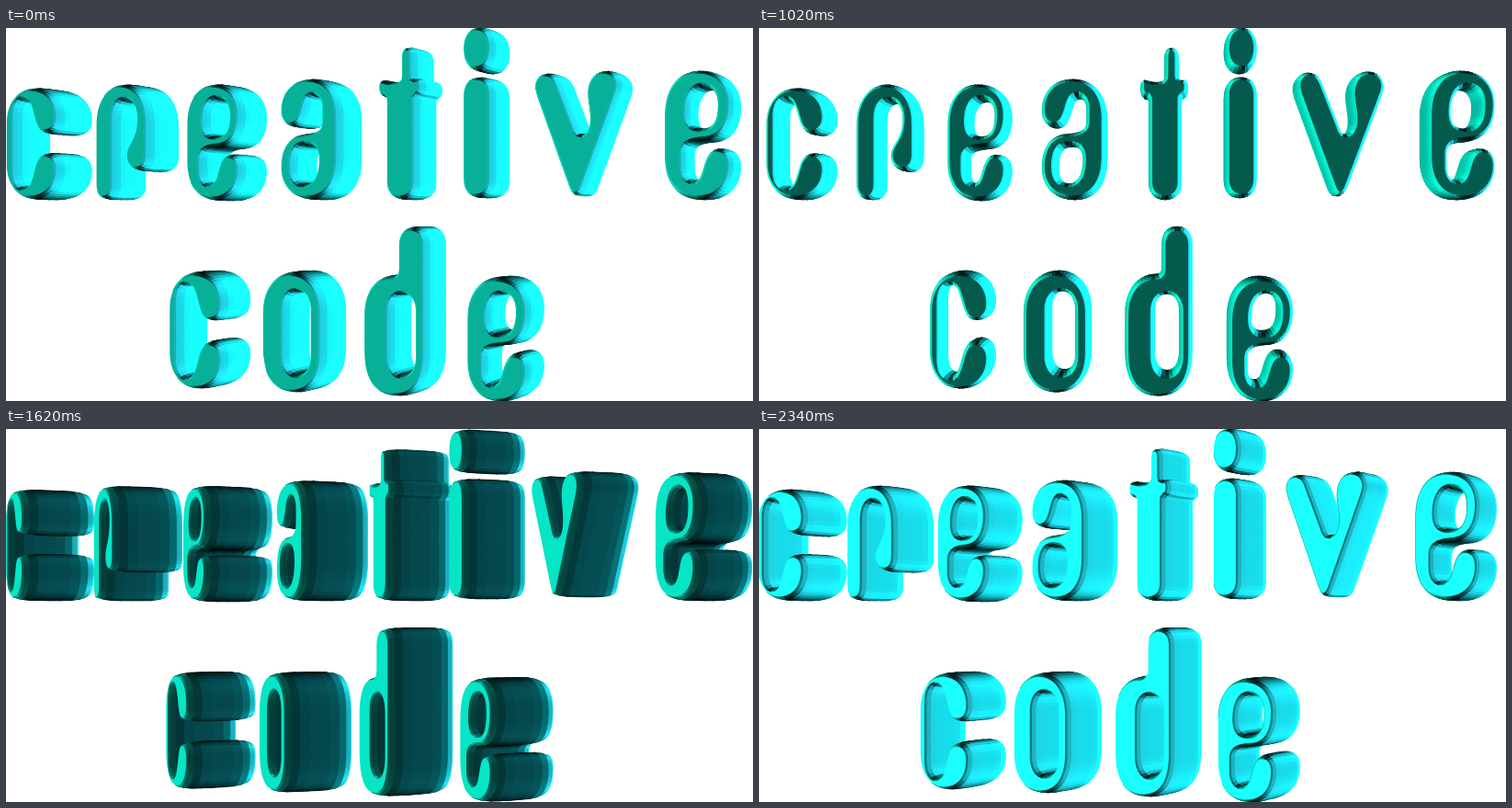
An HTML page with a canvas for the animation above (2.4 s loop, 813 px wide and 406 px high).

```html
<!DOCTYPE html>
<html lang="en">
<head>
<meta charset="utf-8">
<title>creative code</title>
<style>
  html, body { margin: 0; width: 100%; height: 100%; overflow: hidden; background: #fff; }
  canvas { display: block; width: 813px; height: 406px; }
</style>
</head>
<body>
<canvas id="stage" width="813" height="406" role="img" aria-label="creative code"></canvas>
<script>
const ctx = document.getElementById('stage').getContext('2d');
const LOOP = 2400, STEP = 60;
const MID_X = 406, MID_Y = 203, CAMERA = 1950;
const HALF = 40, BULGE = 4, SPREAD = 0.4, BANDS = 10;

// Outlines with the centre they turn about; later subpaths are holes.
const glyphs = {
  c: [47, 126, 'M13.5 104C13.5 82 26 66 47 66C67 66 80.5 78 80.5 98C80.5 109 74 115 65 115C57 115 53.5 110 51 103C47 91 45 78 37 78C30 78 26 86 26 96V156C26 166 30 174 37 174C45 174 47 161 51 149C53.5 142 57 137 65 137C74 137 80.5 143 80.5 154C80.5 174 67 186 47 186C26 186 13.5 170 13.5 148Z'],
  r: [143, 124, 'M110 105C110 80 123 62 143 62C164 62 176 80 176 105V138C176 149 171 155 163 155C154 155 148 148 148 139C148 126 161 122 161 100C161 88 156 79 148 79C139 79 134 87 134 100V170C134 180 130 186 122 186C114 186 110 180 110 170Z'],
  e: [759, 116.5, 'M723 95C723 65 737 47 759 47C783 47 795 63 795 84C795 108 784 121 768 122C757 123 744 124 744 136V152C744 161 749 167 754 167C762 167 763 157 766 148C769 138 773 132 781 132C790 132 795 139 795 150C795 172 781 186 760 186C736 186 723 168 723 140ZM748 92C748 76 754 64 765 64C775 64 780 72 780 84C780 100 776 110 763 110C752 110 748 104 748 92Z'],
  t: [441, 104, 'M442 32C442 25 445 22 449 22C453 22 456 25 456 32V54C456 58 458 58 460 57C464 56 466 59 466 65C466 71 464 74 461 74C459 74 459 75 459 79V168C459 180 452 186 442 186C432 186 425 180 425 168V79C425 75 424 74 421 74C418 74 416 71 416 65C416 59 418 56 422 57C426 59 432 60 436 59C440 59 442 57 442 54Z'],
  i: [523.5, 119, 'M507 74C507 61 513 54 523.5 54S540 61 540 74V164C540 177 534 184 523.5 184S507 177 507 164Z'],
  dot: [523.5, 23, 'M507 23C507 9 513 0 523.5 0S540 9 540 23S534 46 523.5 46S507 37 507 23Z'],
  v: [629.5, 115, 'M583 66C582 55 588 49 596 49C603 49 607 53 610 60L630 112C632 118 638 118 641 112C647 102 641 84 641 72C641 58 648 48 660 48C670 48 677 55 676 66C675 72 673 76 671 82L637 174C634 181 631 182 629 182C625 182 623 179 621 174L585 74Z'],
  o: [325.5, 331, 'M290.5 310C290.5 284 304 266 325.5 266S360.5 284 360.5 310V352C360.5 380 347 396 325.5 396S290.5 380 290.5 352ZM317 306C317 294 323 286 331.5 286S346 294 346 306V356C346 368 340 376 331.5 376S317 368 317 356Z'],
  d: [435, 308.5, 'M399.5 312C399.5 288 411 271 430 270C437 270 439 268 439 262V236C439 224 445 217 455 217S470.5 224 470.5 236V352C470.5 384 458 400 435 400S399.5 384 399.5 352ZM430 308C430 296 436 289 444 289S458 296 458 308V356C458 369 452 377 444 377S430 369 430 356Z']
};

// Light by compass direction of the surface: degrees, r, g, b.
const light = [
  [-120, 4, 120, 105], [-90, 5, 190, 165], [-69, 6, 229, 197], [-51, 6, 229, 197],
  [-41, 10, 255, 221], [-27, 26, 255, 255], [-20.5, 8, 176, 152], [-1.5, 5, 90, 78],
  [19, 4, 48, 48], [28, 5, 70, 75], [37, 5, 110, 115], [49, 36, 205, 220],
  [63, 25, 220, 235], [70, 26, 255, 255], [95, 26, 255, 255], [130, 10, 130, 140]
];

function shade(x, y, z) {
  const az = Math.atan2(x, z) * 180 / Math.PI;
  const last = light.length - 1;
  let k = 1;
  while (k < last && light[k][0] < az) k++;
  const a = light[k - 1], b = light[k];
  const f = Math.min(1, Math.max(0, (az - a[0]) / (b[0] - a[0])));
  const dim = 1 + 0.9 * y * y - 1.7 * y ** 4;
  const ch = n => Math.min(255, Math.round((a[n] + (b[n] - a[n]) * f) * dim));
  return `rgb(${ch(1)},${ch(2)},${ch(3)})`;
}

// Barrel profile from back to front, with the slope between each pair of rings.
const rings = Array.from({ length: BANDS + 1 }, (_, k) => {
  const u = Math.sin((k / BANDS - 0.5) * Math.PI);
  return { z: HALF * u, inset: BULGE * Math.abs(u) ** 5 - SPREAD };
});
const bands = rings.slice(1).map((r, j) => {
  const dz = r.z - rings[j].z, di = r.inset - rings[j].inset, len = Math.hypot(dz, di);
  return { flat: dz / len, front: di / len };
});

function trace(d, place, isHole) {
  const path = document.createElementNS('http://www.w3.org/2000/svg', 'path');
  path.setAttribute('d', d);
  const total = path.getTotalLength(), n = Math.ceil(total / 4);
  const pts = Array.from({ length: n }, (_, i) => place(path.getPointAtLength(total * i / n)));
  const area = pts.reduce((s, p, i) => {
    const q = pts[(i + 1) % n];
    return s + p.x * q.y - q.x * p.y;
  }, 0);
  if ((area > 0) === isHole) pts.reverse();
  const normal = (p, q) => {
    const len = Math.hypot(q.x - p.x, q.y - p.y) || 1;
    return { x: (q.y - p.y) / len, y: (p.x - q.x) / len };
  };
  return pts.map((p, i) => {
    const q = pts[(i + 1) % n];
    return { ...p, n: normal(pts[(i + n - 1) % n], q), face: normal(p, q), mid: (p.x + q.x) / 2 };
  });
}

function letter(name, x, y, sx = 1, sy = 1) {
  const [ox, oy, d] = glyphs[name];
  x = x ?? ox;
  y = y ?? oy;
  const place = p => ({
    x: (p.x - ox) * sx,
    y: (y + (p.y - oy) * sy - MID_Y) * 0.987
  });
  const loops = d.split(/(?=M)/).map((part, i) => trace(part, place, i > 0));
  const walls = loops.flatMap((loop, l) => loop.map((p, i) => ({ p, l, i, j: (i + 1) % loop.length })));
  walls.sort((a, b) => a.p.mid - b.p.mid);
  return { x, loops, walls };
}

const letters = [
  letter('c', 47.5, 126, 0.97), letter('r', 143.5, 124, 0.97), letter('e', 241, 124.5, 0.89, 0.9),
  letter('e', 344, 121, -0.94, -0.935), letter('t'), letter('i'), letter('dot'),
  letter('v'), letter('e'),
  letter('c', 222.5, 329, 0.97, 1.05), letter('o'), letter('d'),
  letter('e', 544.5, 339, 0.95, 0.964)
];

function drawLetter({ x, loops, walls }, sin, cos) {
  const project = (p, ring) => {
    const lx = p.x - p.n.x * ring.inset, ly = p.y - p.n.y * ring.inset;
    const k = CAMERA / (CAMERA - lx * sin - ring.z * cos);
    return [MID_X + (x - MID_X + lx * cos - ring.z * sin) * k, MID_Y + ly * k];
  };
  const pts = loops.map(loop => loop.map(p => rings.map(r => project(p, r))));

  // Walls nearer the viewer come last.
  const fromRight = (MID_X - x) * cos + CAMERA * sin > 0;
  const count = walls.length;
  ctx.lineWidth = 1.1;
  ctx.lineJoin = 'round';
  for (let w = 0; w < count; w++) {
    const { p, l, i, j } = walls[fromRight ? w : count - 1 - w];
    const A = pts[l][i], B = pts[l][j];
    bands.forEach((band, k) => {
      const a = A[k], b = B[k], c = B[k + 1], d = A[k + 1];
      if ((c[0] - a[0]) * (d[1] - b[1]) - (c[1] - a[1]) * (d[0] - b[0]) <= 0) return;
      const nx = p.face.x * band.flat, ny = p.face.y * band.flat, nz = band.front;
      ctx.fillStyle = ctx.strokeStyle = shade(nx * cos - nz * sin, ny, nx * sin + nz * cos);
      ctx.beginPath();
      ctx.moveTo(...a);
      ctx.lineTo(...b);
      ctx.lineTo(...c);
      ctx.lineTo(...d);
      ctx.closePath();
      ctx.fill();
      ctx.stroke();
    });
  }

  ctx.fillStyle = shade(-sin, 0, cos);
  ctx.beginPath();
  for (const loop of pts) {
    loop.forEach((r, i) => ctx[i ? 'lineTo' : 'moveTo'](...r[BANDS]));
    ctx.closePath();
  }
  ctx.fill('evenodd');
}

function draw(t) {
  const phase = 2 * Math.PI * (t - 1800) / LOOP;
  const turn = (22 + 43.5 * Math.cos(phase) + 1.5 * Math.cos(2 * phase)) * Math.PI / 180;
  ctx.fillStyle = '#fff';
  ctx.fillRect(0, 0, 813, 406);
  for (const item of letters) drawLetter(item, Math.sin(turn), Math.cos(turn));
}

let shown = -1;
const start = performance.now();
function tick() {
  const step = Math.floor((performance.now() - start) % LOOP / STEP);
  if (step !== shown) draw((shown = step) * STEP);
  requestAnimationFrame(tick);
}
tick();
</script>
</body>
</html>
```
